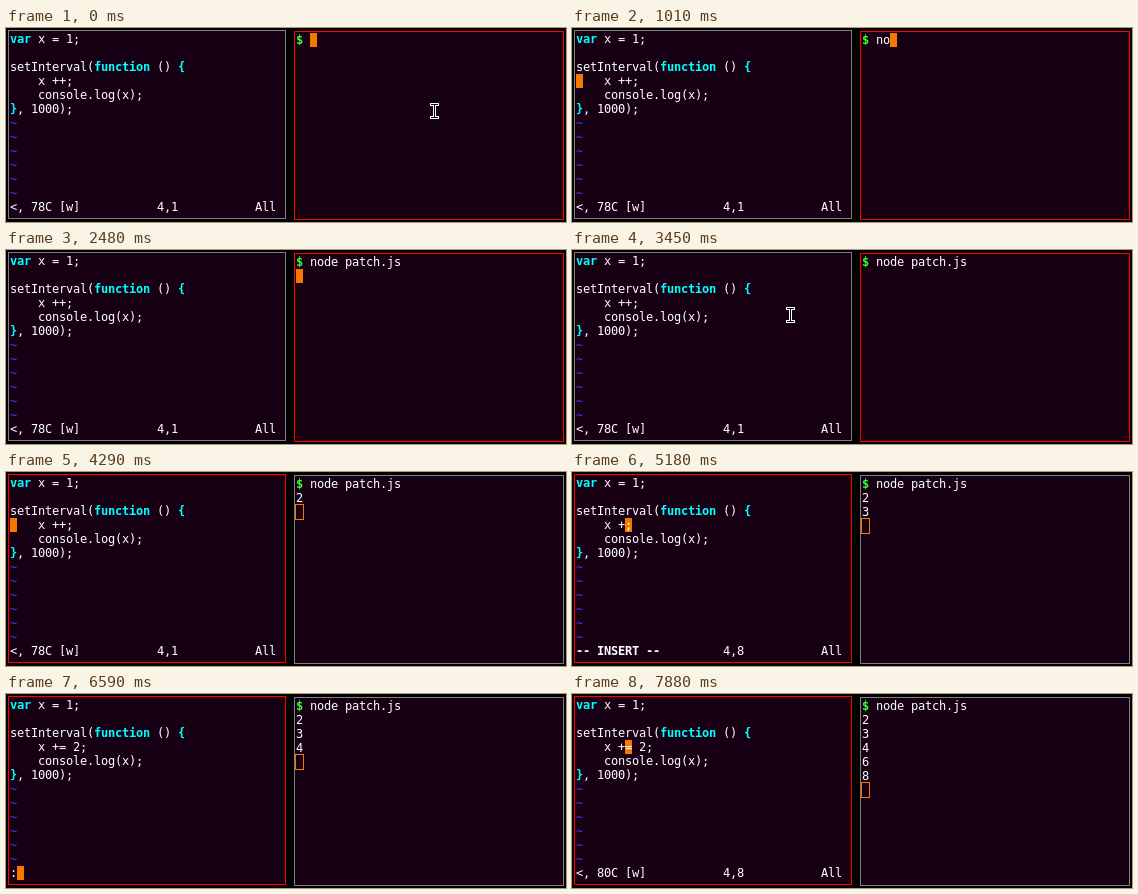
An HTML page that plays this animation: 560x194 px, repeating every 8 s.

```html
<!DOCTYPE html>
<html lang="en">
<head>
<meta charset="utf-8">
<title>Live patching in two terminals</title>
<style>
  html, body { margin: 0; width: 100%; height: 100%; overflow: hidden; background: #000; }
  #stage { position: relative; width: 560px; height: 194px; overflow: hidden; background: #000; }
  .pane {
    position: absolute; box-sizing: border-box; height: 189px; padding: 1px;
    border: 1px solid #7f7f7f; background: #170014; color: #fff;
    font: 12px/14px "DejaVu Sans Mono", monospace;
  }
  .pane.focus { border-color: #f00; }
  #editor { left: 2px; top: 2px; width: 278px; }
  #shell { left: 288px; top: 3px; width: 270px; }
  .line { display: flex; height: 14px; }
  .line i { flex: none; width: 7px; height: 14px; font-style: normal; white-space: pre; }
  .line .key { color: #0ff; font-weight: bold; }
  .line .tilde { color: #3c3cff; }
  .line .prompt { color: #3f3; font-weight: bold; }
  .line .mode { font-weight: bold; }
  .line .block { background: #f57900; color: #fff; }
  .line .hollow { outline: 1px solid #f57900; }
  #pointer { position: absolute; left: 0; top: 0; }
</style>
</head>
<body>
<div id="stage">
  <div id="editor" class="pane"></div>
  <div id="shell" class="pane"></div>
  <svg id="pointer" width="9" height="16" fill="none" stroke-linecap="square">
    <path d="M1.5 1.5h6M4.5 1.5v13M1.5 14.5h6" stroke="#fff" stroke-width="3"/>
    <path d="M1.5 1.5h6M4.5 1.5v13M1.5 14.5h6" stroke="#000"/>
  </svg>
</div>
<script>
const LOOP = 8000, FOCUS = 3530;
const $ = id => document.getElementById(id);
const editor = $('editor'), shell = $('shell'), pointer = $('pointer');

const command = 'node patch.js';
const keyTimes = [970, 1010, 1060, 1150, 1320, 1450, 1590, 1670, 1900, 1980, 2160, 2240, 2330];
const enterTime = 2480;
const output = [[3910, 2], [4900, 3], [5930, 4], [6900, 6], [7880, 8]];

// [time, line, cursor column]
const edits = [
  [0, 'x ++;', 0], [4330, 'x ++;', 8], [4540, 'x ++;', 7], [4940, 'x +;', 7],
  [5970, 'x +=;', 8], [6090, 'x += ;', 9], [6220, 'x += 2;', 10],
  [6450, 'x += 2;', 9], [7650, 'x += 2;', 8], [7830, 'x += 2;', 7]
];
// [time, message, ruler shown, cursor column on the command line]
const statuses = [
  [0, '<, 78C [w]', true], [5180, '-- INSERT --', true], [6450, '', false],
  [6590, ':', false, 1], [6710, ':w', false, 2], [6810, '<, 80C [w]', true]
];
const editorBlink = [[0, 0], [450, 1], [1050, 0], [1630, 1], [2200, 0], [2770, 1],
  [3340, 0], [3950, 1], [5750, 0], [5970, 1], [7400, 0], [7650, 1]];
const shellBlink = [[0, 1], [400, 0], [970, 1], [3080, 0], [FOCUS, 1]];
// [time, x, y]
const path = [[3040, 424, 75], [3440, 214, 57], [3560, 224, 58]];

const at = (list, t) => list.filter(e => e[0] <= t).pop();

function keywords(text) {
  const style = [];
  for (const m of text.matchAll(/var|function|[{}]/g))
    for (let i = 0; i < m[0].length; i++) style[m.index + i] = 'key';
  return i => style[i] || '';
}

function line(text, style, cursor) {
  const row = document.createElement('div');
  row.className = 'line';
  const chars = [...text.padEnd(cursor ? cursor.col + 1 : 0)];
  chars.forEach((c, i) => {
    const cell = document.createElement('i');
    cell.textContent = c;
    cell.className = style(i) + (cursor && cursor.col === i ? ' ' + cursor.kind : '');
    row.append(cell);
  });
  return row;
}

const plain = () => '';
const block = (on, col) => on ? { col, kind: 'block' } : null;

function drawEditor(t) {
  const [, code, col] = at(edits, t);
  const [, message, ruler, prompt] = at(statuses, t);
  const on = at(editorBlink, t)[1];
  const source = ['var x = 1;', '', 'setInterval(function () {', '    ' + code,
    '    console.log(x);', '}, 1000);'];
  const rows = source.map((s, i) =>
    line(s, keywords(s), i === 3 && !prompt ? block(on, col) : null));
  for (let i = 0; i < 6; i++) rows.push(line('~', () => 'tilde'));
  const status = ruler ? message.padEnd(21) + ('4,' + (col + 1)).padEnd(14) + 'All' : message;
  const mode = message.startsWith('--') ? i => i < 12 ? 'mode' : '' : plain;
  rows.push(line(status, mode, prompt ? block(on, prompt) : null));
  editor.replaceChildren(...rows);
  editor.classList.toggle('focus', t >= FOCUS);
}

function drawShell(t) {
  const typed = command.slice(0, keyTimes.filter(k => k <= t).length);
  const texts = ['$ ' + typed];
  if (t >= enterTime) {
    for (const [time, value] of output) if (time <= t) texts.push(String(value));
    texts.push('');
  }
  const last = texts.length - 1;
  const cursor = at(shellBlink, t)[1] ?
    { col: texts[last].length, kind: t < FOCUS ? 'block' : 'hollow' } : null;
  shell.replaceChildren(...texts.map((s, i) =>
    line(s, c => i === 0 && c === 0 ? 'prompt' : '', i === last ? cursor : null)));
  shell.classList.toggle('focus', t < FOCUS);
}

function drawPointer(t) {
  const shown = t < 970 || (t >= 3040 && t < 4290);
  pointer.style.visibility = shown ? 'visible' : 'hidden';
  const s = Math.floor(t / 40) * 40;
  const i = s < path[1][0] ? 0 : 1;
  const [t0, x0, y0] = path[i], [t1, x1, y1] = path[i + 1];
  const k = Math.min(1, Math.max(0, (s - t0) / (t1 - t0)));
  const e = k * k * (3 - 2 * k);
  const x = Math.round(x0 + (x1 - x0) * e), y = Math.round(y0 + (y1 - y0) * e);
  pointer.style.transform = `translate(${x}px, ${y}px)`;
}

const changes = [...new Set([...keyTimes, enterTime, FOCUS,
  ...[output, edits, statuses, editorBlink, shellBlink].flat().map(e => e[0])])];
let shownStep = -1;

function frame() {
  const t = performance.now() % LOOP;
  const step = changes.filter(c => c <= t).length;
  if (step !== shownStep) {
    shownStep = step;
    drawEditor(t);
    drawShell(t);
  }
  drawPointer(t);
  requestAnimationFrame(frame);
}
frame();
</script>
</body>
</html>
```
